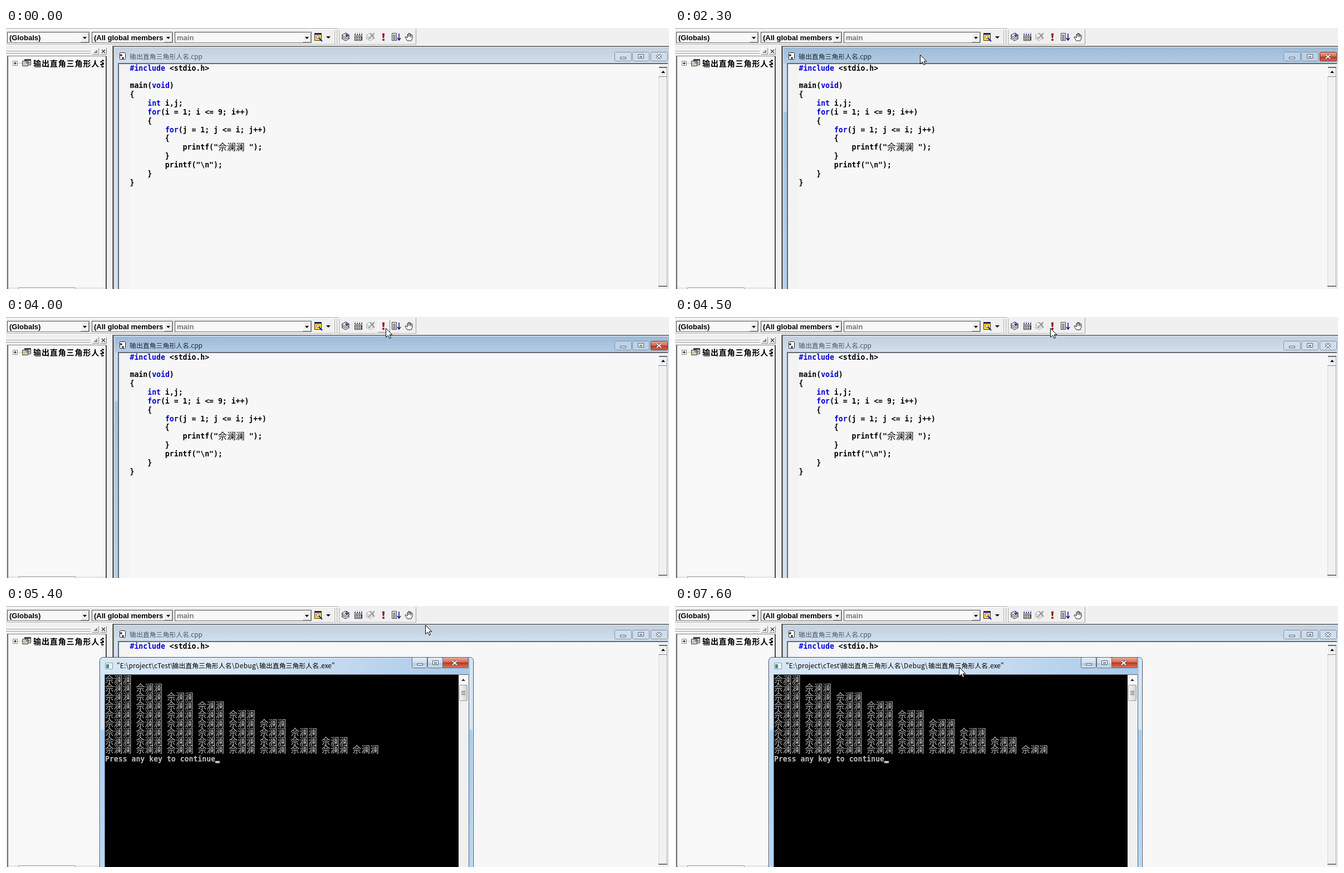
Animation of 1191x470 px, one loop 8 s. Source, as an HTML page with a canvas:

```html
<!DOCTYPE html>
<html lang="zh">
<head>
<meta charset="utf-8">
<style>
html, body { margin: 0; width: 100%; height: 100%; overflow: hidden; background: #f0f0f0; }
canvas { display: block; }
</style>
</head>
<body>
<canvas id="stage" width="1191" height="470"></canvas>
<script>
const g = document.getElementById('stage').getContext('2d');
const MONO = 'bold 13.17px "DejaVu Sans Mono", monospace';
const UI = 'bold 13px "Liberation Sans", sans-serif';
const CJK = '"Noto Sans CJK SC", "Noto Sans CJK", sans-serif';
const COL = 7.93, ROW = 15.87;
const NAME = '佘澜澜', FILE = '输出直角三角形人名';
const CODE = ['#include <stdio.h>', '', 'main(void)', '{', '    int i,j;', '    for(i = 1; i <= 9; i++)',
  '    {', '        for(j = 1; j <= i; j++)', '        {', `            printf("${NAME} ");`,
  '        }', '        printf("\\n");', '    }', '}'];

// Pointer path: time, x, y
const PATH = [[600, 1112, 48], [700, 1067, 43], [800, 1067, 43], [900, 1010, 36], [1200, 760, -25],
  [1400, 388, -25], [1500, 388, 0], [1700, 592, 16], [1800, 597, 20], [1900, 597, 20], [2300, 440, 48],
  [2500, 440, 48], [2800, 598, 18], [3000, 631, 13], [3200, 631, 13], [3400, 690, 18], [3700, 695, 19],
  [4200, 674, 20], [5200, 674, 20], [6000, 990, 74], [6100, 1048, 87], [6200, 1101, 93],
  [6300, 1158, 100], [6600, 1158, 100], [7000, 685, 140], [7200, 685, 140], [7600, 510, 110]];

function box(c, x, y, w, h) { g.fillStyle = c; g.fillRect(x, y, w, h); }
function edge(c, x, y, w, h, r = 0) {
  g.strokeStyle = c; g.lineWidth = 1;
  g.beginPath(); g.roundRect(x + .5, y + .5, w - 1, h - 1, r); g.stroke();
}
function fade(x, y, x2, y2, ...stops) {
  const f = g.createLinearGradient(x, y, x2, y2);
  stops.forEach(([p, c]) => f.addColorStop(p, c));
  return f;
}
function text(s, x, y, font, c = '#000', spacing = 0) {
  g.font = font; g.fillStyle = c; g.letterSpacing = spacing + 'px';
  g.fillText(s, x, y);
}
function shape(x, y, path, fill, line, width = 1) {
  const p = new Path2D(path);
  g.save(); g.translate(x, y);
  if (fill) { g.fillStyle = fill; g.fill(p); }
  if (line) { g.strokeStyle = line; g.lineWidth = width; g.stroke(p); }
  g.restore();
}
function bevel(x, y, w, h, down) {
  const [a, b] = down ? ['#888', '#fff'] : ['#fff', '#888'];
  box(a, x, y, w, 1); box(a, x, y, 1, h);
  box(b, x, y + h - 1, w, 1); box(b, x + w - 1, y, 1, h);
}
function mono(s, x, y, c) {
  for (const part of s.match(/[^\x00-\x7f]+|[\x00-\x7f]+/g) || []) {
    const wide = part.charCodeAt(0) > 127;
    text(part, x, y + (wide ? 1 : 0), wide ? `300 ${ROW}px ${CJK}` : MONO, c);
    x += part.length * (wide ? ROW : COL);
  }
}

function combo(x, w, label, c) {
  box('#f8f8f8', x, 7, w, 20); edge('#777', x, 7, w, 20); box('#444', x, 7, w, 1); box('#444', x, 7, 1, 20);
  box('#f0f0f0', x + w - 16, 9, 15, 17); bevel(x + w - 16, 9, 15, 17);
  shape(x + w - 12, 16, 'M0 0H7L3.5 4Z', '#000');
  g.save(); g.beginPath(); g.rect(x, 7, w - 18, 20); g.clip();
  text(label, x + 4, 21.5, UI, c);
  g.restore();
}

function stack(x, c) {
  for (const y of [19, 16, 13]) shape(x, y, 'M-7 0L0 -4L7 0L0 4Z', '#f8f8f8', c);
}

function toolbar(t, px) {
  box('#a0a0a0', 0, 0, 597, 1); box('#fff', 0, 1, 597, 1);
  box('#b0b0b0', 0, 29, 737, 1); box('#fff', 0, 30, 1191, 1);
  combo(2, 148, '(Globals)'); combo(154, 146, '(All global members'); combo(303, 246, 'main', '#777');
  for (const x of [589, 593, 597]) { box('#fff', x, 3, 1, 27); box('#a8a8a8', x + 1, 3, 1, 27); }
  box('#a0a0a0', 736, 2, 1, 28);

  box('#f4dc30', 554, 9, 13, 14); box('#1010a0', 554, 9, 13, 3); edge('#333', 554, 9, 13, 14);
  shape(560, 16, 'M-3 0L0 -3L3 0L0 3Z', '#fff', '#c03020');
  shape(560, 16, 'M2 2L8 8', null, '#1414b4', 2);
  shape(575, 15, 'M0 0H8L4 4Z', '#000');

  stack(610, '#222');
  shape(612, 9, 'M0 0V6M-3 3L0 6L3 3', null, '#123a8c', 1.5);
  box('#fff', 626, 14, 14, 8); edge('#222', 626, 14, 14, 9);
  for (let i = 0; i < 4; i++) {
    box('#1a1a80', 627 + i * 4, 9, 1, 1); box('#1a1a80', 626 + i * 4, 11, 2, 2);
    box('#222', 628 + i * 3, 16, 2, 2); box('#222', 628 + i * 3, 19, 2, 2);
  }
  stack(654, '#aaa');
  shape(657, 14, 'M-6 6L5 -5M-3 -4L5 5', null, '#888', 1.5);
  shape(678, 10, 'M-2 0Q0 -1 2 0L1.2 8H-1.2ZM-1.7 9.5H1.7V13H-1.7Z', '#980000');
  box('#fff', 693, 9, 9, 14); edge('#333', 693, 9, 9, 14);
  for (let y = 12; y < 21; y += 2) box('#333', 695, y, 5, 1);
  shape(706, 10, 'M0 0V11M-3 8L0 12L3 8', null, '#1010a0', 1.5);
  shape(724, 16, 'M-3 7L-7 1Q-7 -1 -5 0L-3 2V-4Q-2 -6 -1 -4V-6Q0 -8 1 -6V-5Q2 -7 3 -5V-3Q5 -5 6 -3V2L4 7Z', '#fff', '#222');
  shape(724, 16, 'M-1 -4V0M1.5 -5V0M3.7 -3V1', null, '#222');

  if (t >= 2800 && t < 4500) {
    const i = Math.floor((px - 598) / 23), x = 599 + i * 23, down = t >= 3000 && t < 3300;
    if (i >= 0 && i < 5) {
      if (down) for (let k = 0; k < 180; k++) box('#ffffff99', x + 1 + k % 10 * 2 + (k / 10 | 0) % 2, 8 + (k / 10 | 0), 1, 1);
      bevel(x, 6, 22, 22, down);
    }
  }
}

function sidePane() {
  for (const y of [39, 43]) { box('#fff', 0, y, 152, 1); box('#a0a0a0', 0, y + 2, 152, 1); }
  for (const x of [155, 169]) bevel(x, 36, 12, 12);
  shape(157, 45, 'M0 0H7V-6Z', '#888');
  shape(172, 39, 'M0 0L6 6M6 0L0 6', null, '#333', 1.3);
  box('#f8f8f8', 2, 50, 180, 420);
  box('#888', 2, 50, 179, 1); box('#666', 2, 50, 2, 420); box('#444', 179, 51, 2, 419);
  box('#fff', 181, 50, 1, 420);
  box('#e8e8e8', 4, 467, 175, 3); box('#f4f4f4', 22, 467, 103, 3); edge('#999', 22, 467, 103, 5);

  edge('#888', 12, 59, 9, 9); box('#000', 14, 63, 5, 1); box('#000', 16, 61, 1, 5);
  for (let x = 22; x < 29; x += 2) box('#999', x, 63, 1, 1);
  box('#ddd', 33, 56, 12, 11); box('#445', 33, 56, 12, 3); edge('#333', 33, 56, 12, 11);
  box('#ccc', 29, 59, 11, 10); edge('#444', 29, 59, 11, 10); box('#e0c040', 31, 63, 3, 3);
  box('#555', 35, 61, 8, 1); box('#555', 36, 63, 7, 1);
  g.save(); g.beginPath(); g.rect(4, 52, 172, 30); g.clip();
  text(FILE, 49, 69, 'bold 14px ' + CJK, '#000', .9);
  g.restore();
}

function glyph(kind, x, y, c) {
  if (kind === 0) { box('#fff', x - 5, y, 11, 4); edge(c, x - 5, y, 11, 4); }
  if (kind === 1) { box('#fff', x - 5, y - 4, 11, 8); edge(c, x - 5, y - 4, 11, 8); edge(c, x - 2, y - 1, 5, 3); }
  if (kind === 2) {
    shape(x, y, 'M-4 -3L4 4M4 -3L-4 4', null, c, 4);
    shape(x, y, 'M-4 -3L4 4M4 -3L-4 4', null, '#fff', 1.8);
  }
}

const RED = y => fade(0, y, 0, y + 18, [0, '#e8a898'], [.45, '#d0705c'], [.5, '#bc3420'], [1, '#d8785c']);

function editor(active, caret) {
  box('#fff', 190, 31, 1, 439); box('#777', 191, 32, 1000, 2); box('#666', 191, 32, 3, 438);
  box(active ? fade(0, 34, 0, 64, [0, '#9db9d6'], [1, '#b4cde6']) : fade(0, 34, 0, 64, [0, '#c2d0df'], [1, '#d2dfec']), 194, 34, 997, 436);
  box(active ? fade(0, 64, 0, 470, [0, '#c8dcf0'], [.21, '#c8dcf0'], [.22, '#a4c4e4'], [1, '#b4d0ec']) : '#d3e0ee', 195, 64, 6, 406);
  box('#eef4fa', 194, 34, 997, 1); box('#eef4fa', 194, 34, 1, 436);

  box('#fff', 205, 44, 10, 13); edge('#222', 204, 44, 11, 13, 1);
  shape(209, 50, 'M-2 -3V1M-4 -1H0M1 2V6M-1 4H3', null, '#222', 1.4);
  text(FILE + '.cpp', 222, 55.5, '11.9px ' + CJK, active ? '#1c2733' : '#4c5763');
  [1093, 1125, 1158].forEach((x, i) => {
    const red = active && i === 2;
    box(red ? RED(43) : active ? '#bcd2e9' : '#d0deec', x, 43, 31, 17);
    edge(red ? '#7a3028' : '#8090a8', x, 43, 31, 17, 2);
    glyph(i, x + 15, i ? 51 : 52, red ? '#704040' : '#4e5764');
  });

  box('#f7f7f7', 201, 64, 988, 406); box('#5f6973', 201, 63, 988, 2); box('#5f6973', 201, 63, 2, 407);
  box('#f3f3f3', 203, 65, 19, 405);
  box('#f0f0f0', 1172, 67, 16, 403); box('#666', 1173, 70, 15, 2); bevel(1172, 72, 16, 16);
  box('#a0a0a0', 1187, 72, 1, 393); box('#ddd', 1172, 88, 1, 377); box('#777', 1172, 464, 16, 2);
  shape(1177, 81, 'M0 0H7L3.5 -4Z', '#000');
  box('#dbe6f1', 1189, 64, 2, 406);

  CODE.forEach((line, row) => {
    const y = 76.5 + row * ROW;
    mono(line, 222.5, y);
    const key = line.match(/#include|void|int(?= )|for/);
    if (key) {
      const x = 222.5 + key.index * COL;
      box('#f7f7f7', x, y - 11, key[0].length * COL, 15);
      mono(key[0], x, y, '#0000d8');
    }
  });
  if (caret) box('#000', 222, 65, 2, 15);
}

function consoleWindow(printed, caret) {
  const side = fade(0, 93, 0, 470, [0, '#d4e5f7'], [.34, '#d2e5f8'], [.35, '#a5cdf2'], [1, '#b5d8f4']);
  g.fillStyle = side; g.beginPath(); g.roundRect(168, 92, 672, 400, 6); g.fill();
  box(fade(169, 0, 839, 0, [0, '#d6e6f6'], [.3, '#dce9f6'], [.65, '#c2d9f0'], [1, '#a9c8e8']), 175, 94, 658, 29);
  edge('#3c4654', 168, 92, 672, 400, 6); edge('#f0f7ff', 169, 93, 670, 400, 5);
  box('#f2f2f2', 178, 102, 14, 12); edge('#8a98a8', 178, 102, 14, 12); box('#3f8f80', 180, 105, 5, 7);
  const font = '11.9px ' + CJK;
  [['"E:\\project\\cTest\\', 199, .2], [FILE, 298.5], ['\\Debug\\', 406, .4], [FILE, 455], ['.exe"', 563]]
    .forEach(([s, x, spacing]) => text(s, x, 112, font, '#000', spacing));
  [[729, 28], [757, 28], [784, 47]].forEach(([x, w], i) => {
    box(i === 2 ? RED(93) : fade(0, 93, 0, 112, [0, '#e3edf7'], [.5, '#cfdeee'], [.52, '#b4cade'], [1, '#cfe0f0']), x, 93, w, 19);
    edge('#5e6d80', x, 92, w, 20, 2);
    glyph(i, x + (w >> 1) - (i === 2 ? 1 : 0), i ? 102 : 103, '#4c5664');
  });

  edge('#56687c', 177, 123, 655, 400);
  box('#000', 178, 124, 635, 346); box('#f0f0f0', 813, 124, 18, 346);
  box('#f8f8f8', 814, 125, 15, 16);
  shape(818, 135, 'M0 0H7L3.5 -4Z', '#333');
  box(fade(814, 0, 829, 0, [0, '#fafafa'], [.5, '#e4e4e4'], [1, '#cfcfcf']), 814, 142, 15, 29);
  edge('#999', 814, 142, 15, 29, 2);
  for (const y of [153, 156, 159]) box('#555', 818, y, 7, 1);

  if (printed) {
    for (let i = 0; i < 9; i++) mono((NAME + ' ').repeat(i + 1), 178, 136.5 + i * ROW, '#c0c0c0');
    mono('Press any key to continue', 178, 280, '#c0c0c0');
  }
  if (caret) box('#c0c0c0', 376, 279, 8, 4);
}

function pointerAt(t) {
  const i = PATH.findIndex(p => p[0] > t);
  if (i < 0) return PATH.at(-1).slice(1);
  const [t0, x0, y0] = PATH[i - 1], [t1, x1, y1] = PATH[i], k = (t - t0) / (t1 - t0);
  return [x0 + (x1 - x0) * k, y0 + (y1 - y0) * k].map(Math.round);
}

function pointer(x, y, open) {
  const overConsole = open && x > 168 && x < 840 && y > 92;
  if (y > 66 && x > 202 && x < 1172 && !overConsole)
    shape(x + .5, y + .5, 'M-3 -7H-1L0 -6L1 -7H3M0 -6V6M-3 7H-1L0 6L1 7H3', null, '#000');
  else
    shape(x + .5, y + .5, 'M0 0V16L4 12.5L6.5 18L9 17L6.5 11.5H11.5Z', '#fff', '#000');
}

function draw(time) {
  const t = Math.min(Math.floor(time % 8000 / 100) * 100, 7600);
  const p = t >= 600 ? pointerAt(t) : null, open = t >= 4600;
  box('#f0f0f0', 0, 0, 1191, 470);
  toolbar(t, p ? p[0] : 0);
  sidePane();
  editor(t >= 2300 && t < 4500, t >= 3400 && t < 3900);
  if (open) consoleWindow(t >= 4800, t >= 5300 && Math.floor((t - 5300) / 525) % 2 === 0);
  if (p) pointer(...p, open);
}

const start = performance.now();
function tick() { draw(performance.now() - start); requestAnimationFrame(tick); }
tick();
</script>
</body>
</html>
```
